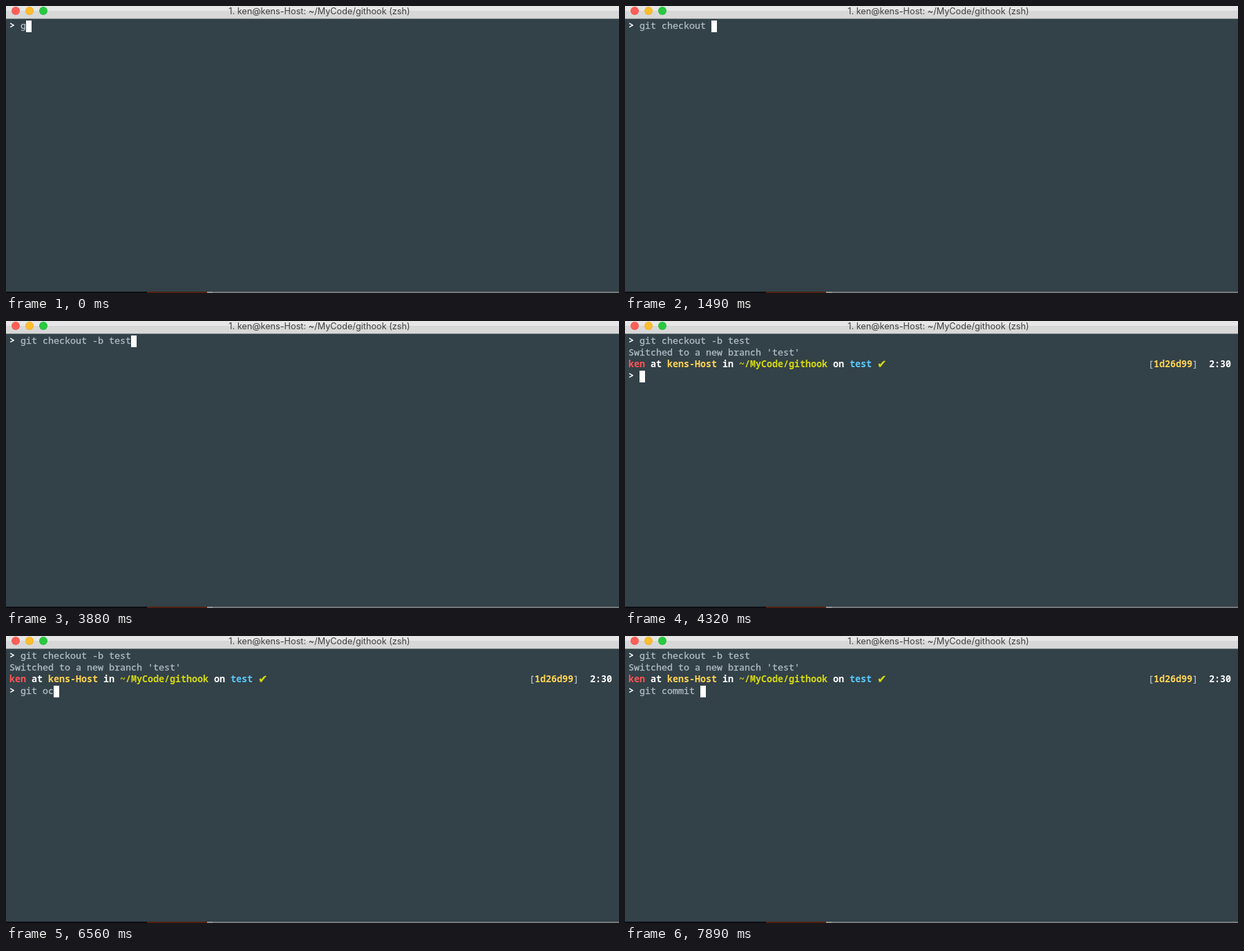
Animation of 887x416 px, one loop 8000 ms. Source, as an HTML page:

```html
<!DOCTYPE html>
<html lang="en">
<head>
<meta charset="utf-8">
<title>Terminal</title>
<style>
html, body { margin: 0; width: 887px; height: 416px; overflow: hidden; }
body { position: relative; background: #334148; }
body * { position: absolute; }
#bar { left: 0; top: 0; width: 887px; height: 19px; background: linear-gradient(#e7e7e7 0 7px, #d8d8d8 7px 18px, #7f878a 18px); }
#bar i { top: 1px; width: 12px; height: 12px; border-radius: 50%; box-shadow: inset 0 0 0 1px #0001; }
#title { left: 0; width: 907px; top: 0; text-align: center; font: 12.7px/15px Inter, sans-serif; color: #404040; white-space: pre; }
#edge { left: 0; top: 414px; width: 887px; height: 2px; background: linear-gradient(90deg, #0b0e14 0 204px, #522214 204px 291px, #8f9393 291px 299px, #74797b 299px); }
.t { font: 500 13.333px/17px "Noto Sans Mono", "DejaVu Sans Mono", monospace; white-space: pre; font-variant-ligatures: none; -webkit-text-stroke: .3px; }
.bold { font-weight: 700; -webkit-text-stroke: 0; }
.check { font: 16px/17px "DejaVu Sans", sans-serif; }
#cursor { width: 8px; height: 17px; background: #fff; }
</style>
</head>
<body>
<div id="bar">
  <i style="left:8px;background:#ff5f57"></i>
  <i style="left:28px;background:#ffbd2e"></i>
  <i style="left:48px;background:#28c940"></i>
  <div id="title"></div>
</div>
<div id="edge"></div>
<div id="cursor"></div>
<script>
const LOOP = 8000, CELL = 8, ROW = 17, LEFT = 5, TOP = 21;
const GREY = '#b0bec5', WHITE = '#fff', RED = '#ff5555', GOLD = '#ffd452', LIME = '#d4d90e', CYAN = '#5ac8fa';
const title = document.getElementById('title');
const cursor = document.getElementById('cursor');

function put(col, row, text, color, style = '') {
  const el = document.createElement('span');
  el.className = 't ' + style;
  el.textContent = text;
  el.style.cssText = `left:${LEFT + col * CELL}px;top:${TOP - 1 + row * ROW}px;color:${color}`;
  document.body.append(el);
  return el;
}

put(0, 0, '>', WHITE, 'bold');
const first = put(2, 0, '', GREY);
const reply = put(0, 1, "Switched to a new branch 'test'", GREY);
const prompt = [
  [0, 2, 'ken', RED, 'bold'], [4, 2, 'at', WHITE, 'bold'],
  [7, 2, 'kens-Host', GOLD, 'bold'], [17, 2, 'in', WHITE, 'bold'],
  [20, 2, '~/MyCode/githook', LIME, 'bold'], [37, 2, 'on', WHITE, 'bold'],
  [40, 2, 'test', CYAN, 'bold'], [45, 2, '✔', LIME, 'check'],
  [94, 2, '[', GREY], [95, 2, '1d26d99', GOLD, 'bold'], [102, 2, ']', GREY],
  [105, 2, '2:30', WHITE, 'bold'], [0, 3, '>', WHITE, 'bold']
].map(a => put(...a));
const second = put(2, 3, '', GREY);

// [start time, typed text]
const typeFirst = [
  [0, 'g'], [150, 'git'], [300, 'git '],
  [600, 'git c'], [750, 'git ch'], [900, 'git chec'], [1050, 'git check'],
  [1200, 'git checko'], [1340, 'git checkout'], [1490, 'git checkout '],
  [3140, 'git checkout -'], [3290, 'git checkout -b'], [3430, 'git checkout -b '],
  [3730, 'git checkout -b te'], [3880, 'git checkout -b test']
];
const typeSecond = [
  [0, ''], [4920, 'g'], [5070, 'gi'], [5220, 'git '], [5370, 'git o'],
  [5520, 'git ocm'], [5820, 'git ocmm'], [6260, 'git ocm'], [6560, 'git oc'],
  [6710, 'git o'], [6850, 'git '], [7000, 'git c'], [7150, 'git co'],
  [7300, 'git com'], [7440, 'git comm'], [7590, 'git commi'],
  [7740, 'git commit'], [7890, 'git commit ']
];
const ENTER = 4170, READY = 4320;

const typed = (steps, t) => steps.filter(s => s[0] <= t).pop()[1];
const show = (el, on) => { el.style.visibility = on ? 'visible' : 'hidden'; };

function draw(t) {
  const ready = t >= READY, running = t >= ENTER && !ready;
  first.textContent = typed(typeFirst, t);
  second.textContent = typed(typeSecond, t);
  show(reply, t >= ENTER);
  prompt.forEach(el => show(el, ready));
  title.textContent = `1. ken@kens-Host: ~/MyCode/githook (${running ? 'git' : 'zsh'})`;
  const row = ready ? 3 : running ? 2 : 0;
  const col = running ? 0 : 2 + (ready ? second : first).textContent.length;
  cursor.style.left = LEFT + col * CELL + 'px';
  cursor.style.top = TOP + row * ROW + 'px';
}

const start = performance.now();
function tick() {
  draw((performance.now() - start) % LOOP);
  requestAnimationFrame(tick);
}
tick();
</script>
</body>
</html>
```
